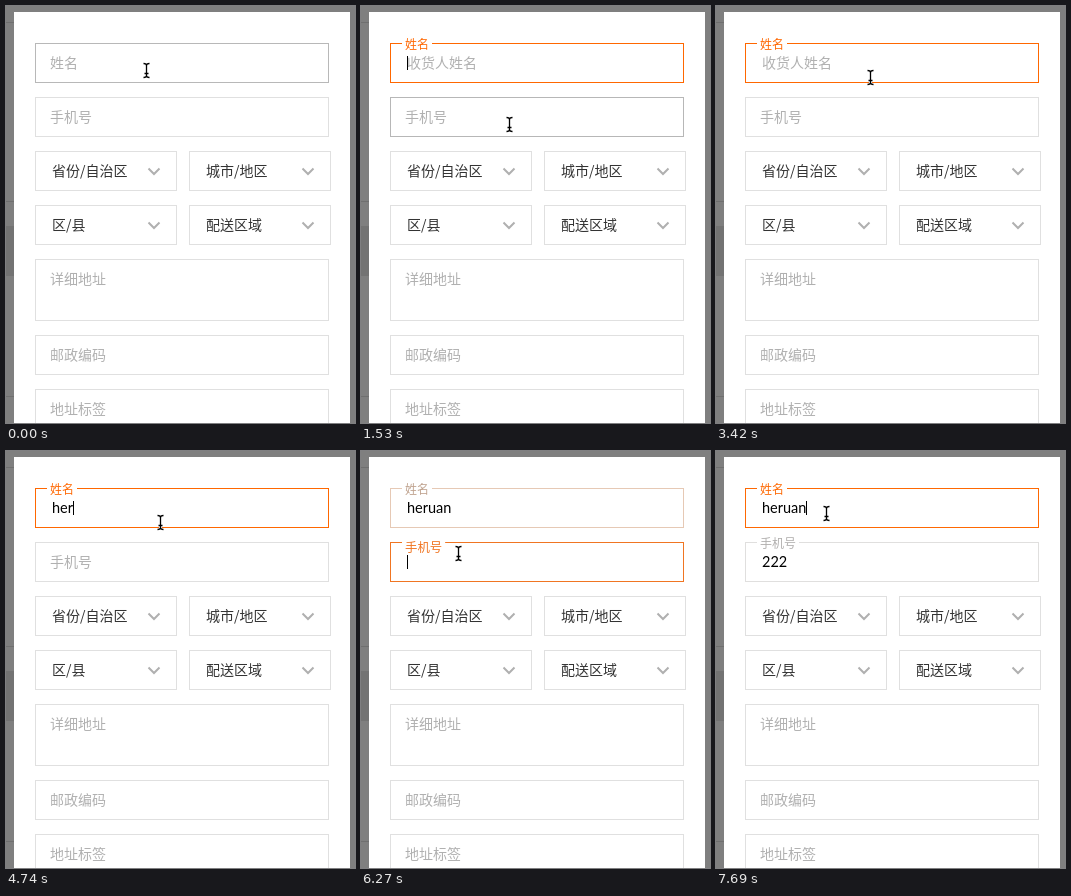
These frames come from a looping animation (349x417 px, 8000 ms). An HTML page with a canvas:

```html
<!DOCTYPE html>
<html lang="zh-CN">
<head>
<meta charset="utf-8">
<style>
  html, body { margin: 0; width: 349px; height: 417px; overflow: hidden; background: #7f7f7f; }
  canvas { display: block; }
</style>
</head>
<body>
<canvas id="stage" width="349" height="417"></canvas>
<script>
const ctx = document.getElementById('stage').getContext('2d');
const LOOP = 8000, TICK = 118.2, FADE = 250;
const CJK = '"Noto Sans CJK SC", "Noto Sans CJK", sans-serif';
const LATIN = 'Lato, sans-serif';
const LINE = [224, 224, 224], HOVER = [176, 176, 176], ORANGE = [255, 103, 0];

// Each pair is a span of time; typed entries are [time, length shown].
const fields = [
  { y: 37, label: '姓名', hint: '收货人姓名', value: 'heruan',
    hover: [[-130, 1360], [2500, 5600], [7180, 9000]],
    focus: [[420, 1740], [2870, 6140], [7470, 9000]],
    typed: [[4440, 1], [4560, 2], [4680, 3], [4800, 4], [5030, 6]] },
  { y: 91, label: '手机号', hint: '11位手机号', value: '222',
    hover: [[1400, 2400], [5750, 7080]],
    focus: [[1740, 2870], [6140, 7470]],
    typed: [[6450, 1], [6690, 2], [6810, 3]] },
];
const caretOn = [[420, 900], [1270, 2230], [2900, 3380], [3840, 5500], [6140, 7290], [7470, 9000]];
const pointerPath = [
  [0, 140, 64], [1190, 140, 64], [1530, 148, 118], [2050, 148, 118], [2705, 154, 71],
  [5450, 154, 71], [5790, 100, 94], [5910, 97, 102], [7000, 97, 102], [7330, 110, 62], [LOOP, 110, 62],
];

const clamp = x => Math.min(1, Math.max(0, x));
const ease = x => 1 - (1 - clamp(x)) ** 2.4;
const lerp = (a, b, p) => a + (b - a) * p;
const mix = (a, b, p) => a.map((v, i) => lerp(v, b[i], p));
const rgb = c => `rgb(${c.map(Math.round)})`;
const within = (spans, t) => spans.some(([a, b]) => t >= a && t < b);
const level = (spans, t) =>
  spans.reduce((sum, [a, b]) => sum + ease((t - a) / FADE) - ease((t - b) / FADE), 0);

function rect(x, y, w, h, color) {
  ctx.fillStyle = color;
  ctx.fillRect(x, y, w, h);
}

function box(x, y, w, h, color = rgb(LINE)) {
  ctx.strokeStyle = color;
  ctx.lineWidth = 1;
  ctx.strokeRect(x + .5, y + .5, w - 1, h - 1);
}

function text(str, x, middle, color = '#b0b0b0', size = 14, family = CJK) {
  ctx.font = `${size}px ${family}`;
  ctx.fillStyle = color;
  ctx.fillText(str, x, middle + size * .37);
}

function select(x, y, label) {
  box(x, y, 142, 40);
  text(label, x + 17, y + 20, '#333');
  ctx.strokeStyle = '#b0b0b0';
  ctx.lineWidth = 2;
  ctx.beginPath();
  ctx.moveTo(x + 113.5, y + 17.5);
  ctx.lineTo(x + 119, y + 23);
  ctx.lineTo(x + 124.5, y + 17.5);
  ctx.stroke();
}

function backdrop() {
  rect(0, 0, 349, 417, '#7f7f7f');
  rect(0, 220, 8, 50, '#737373');
  for (const y of [16, 195, 390]) rect(0, y, 8, 1, '#6f6f6f');
  rect(8, 6, 336, 411, '#fff');
  select(29, 145, '省份/自治区');
  select(183, 145, '城市/地区');
  select(29, 199, '区/县');
  select(183, 199, '配送区域');
  [['详细地址', 253, 62], ['邮政编码', 329, 40], ['地址标签', 383, 40]].forEach(([label, y, h]) => {
    box(29, y, 294, h);
    text(label, 44, y + 20);
  });
}

function drawField(f, t) {
  const focus = level(f.focus, t);
  const count = f.typed.reduce((n, [at, len]) => t >= at ? len : n, 0);
  const value = f.value.slice(0, count);
  const lift = count ? 1 : focus;
  const middle = f.y + 20;

  box(29, f.y, 294, 40, rgb(mix(mix(LINE, HOVER, level(f.hover, t)), ORANGE, focus)));
  if (!count) {
    ctx.globalAlpha = clamp((focus - .85) / .15);
    text(f.hint, 46, middle);
    ctx.globalAlpha = 1;
  }

  const size = lerp(14, 12, lift), labelY = lerp(middle, f.y + 1.5, lift);
  if (lift > .05) rect(41, labelY - 6, f.label.length * size + 6, 12, '#fff');
  text(f.label, 44, labelY, rgb(mix(HOVER, ORANGE, focus)), size);

  text(value, 46, middle - .5, '#000', 14.5, LATIN);
  if (within(f.focus, t) && within(caretOn, t)) {
    rect(46 + Math.round(ctx.measureText(value).width), f.y + 13, 1, 14, '#000');
  }
}

function drawPointer(t) {
  const i = pointerPath.findIndex(p => p[0] > t);
  const [t0, x0, y0] = pointerPath[i - 1], [t1, x1, y1] = pointerPath[i];
  const p = clamp((t - t0) / (t1 - t0));
  const x = Math.round(lerp(x0, x1, p)) + .5, y = Math.round(lerp(y0, y1, p)) + .5;
  ctx.beginPath();
  for (const s of [-1, 1]) {
    ctx.moveTo(x - 3, y + 7 * s);
    ctx.quadraticCurveTo(x, y + 7 * s, x, y + 5 * s);
    ctx.quadraticCurveTo(x, y + 7 * s, x + 3, y + 7 * s);
  }
  ctx.moveTo(x, y - 6);
  ctx.lineTo(x, y + 6);
  ctx.moveTo(x - 2, y + 3);
  ctx.lineTo(x + 2, y + 3);
  for (const [color, width] of [['#fff', 3], ['#000', 1.3]]) {
    ctx.strokeStyle = color;
    ctx.lineWidth = width;
    ctx.stroke();
  }
}

function draw() {
  const t = Math.floor(performance.now() % LOOP / TICK + .1) * TICK;
  backdrop();
  fields.forEach(f => drawField(f, t));
  drawPointer(t);
  requestAnimationFrame(draw);
}
draw();
</script>
</body>
</html>
```
